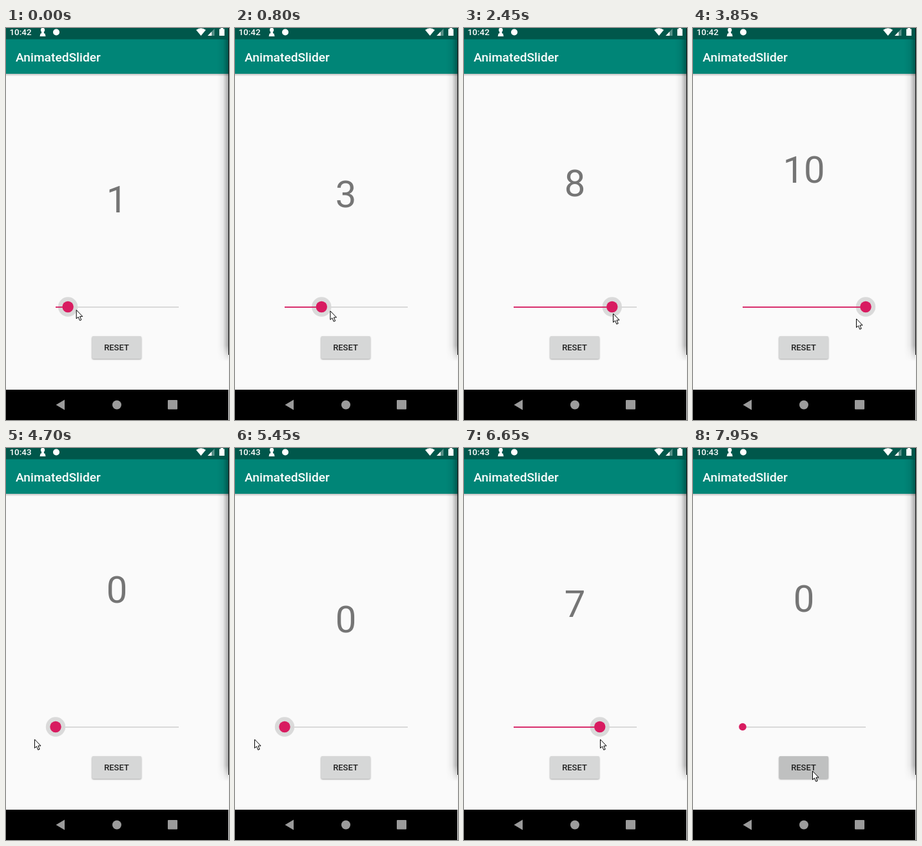
These frames come from a looping animation (346x608 px, 8 s). An HTML page:

```html
<!DOCTYPE html>
<html lang="en">
<head>
<meta charset="utf-8">
<title>Animated slider</title>
<style>
  html, body { margin: 0; width: 100%; height: 100%; overflow: hidden; background: #fafafa; }
  svg { display: block; width: 100%; height: 100%; font-family: Roboto, "Open Sans", sans-serif; }
  .medium { font-weight: 500; }
</style>
</head>
<body>
<svg viewBox="0 0 346 608">
  <defs>
    <linearGradient id="barShadow" x1="0" y1="0" x2="0" y2="1">
      <stop offset="0" stop-opacity=".24"/>
      <stop offset="1" stop-opacity="0"/>
    </linearGradient>
    <linearGradient id="edgeShadow">
      <stop offset="0" stop-opacity="0"/>
      <stop offset=".5" stop-opacity=".06"/>
      <stop offset="1" stop-opacity=".33"/>
    </linearGradient>
    <linearGradient id="edgeEnd" x1="0" y1="0" x2="0" y2="1">
      <stop offset=".95" stop-color="#fff"/>
      <stop offset="1" stop-color="#000"/>
    </linearGradient>
    <mask id="edgeMask"><rect x="325" y="17" width="21" height="500" fill="url(#edgeEnd)"/></mask>
    <filter id="soft" x="-10%" y="-20%" width="120%" height="150%"><feGaussianBlur stdDeviation="1"/></filter>
  </defs>

  <rect width="346" height="608" fill="#fafafa"/>

  <!-- status bar and toolbar -->
  <rect y="71" width="346" height="4" fill="url(#barShadow)"/>
  <rect width="346" height="71" fill="#008577"/>
  <rect width="346" height="17.5" fill="#00574b"/>
  <text id="clock" class="medium" x="5.5" y="11" font-size="13.4" fill="#fff">10:42</text>
  <g fill="#fff">
    <circle cx="57" cy="3" r="3.2"/>
    <path d="M55.5 4h3l.6 4.5h1.4l1 4.5h-9l1-4.5h1.4z"/>
    <circle cx="78" cy="6.5" r="5"/>
    <path d="M295 3Q302.500-2.500 310 3L302.500 12Z"/>
    <path d="M313 12L323.500 1V12Z" opacity=".35"/>
    <path d="M313 12L319 5.700V12Z"/>
    <path d="M331 1.500h2V0h4v1.500h2V12h-8z"/>
  </g>
  <text class="medium" x="15" y="52" font-size="19.2" fill="#fff">AnimatedSlider</text>

  <text id="number" x="172" font-size="58" fill="#757575" text-anchor="middle"></text>

  <!-- slider -->
  <circle id="halo" cy="432.5" r="15.2" fill-opacity=".125"/>
  <rect x="77" y="432" width="191" height="1.8" fill="#d6d6d6"/>
  <rect id="progress" x="77" y="432" height="1.8" fill="#d81b60"/>
  <circle id="thumb" cy="432.5" fill="#d81b60"/>

  <!-- button -->
  <rect x="133.5" y="479" width="76.5" height="35" rx="2" opacity=".35" filter="url(#soft)"/>
  <rect id="button" x="133.5" y="478" width="76.5" height="35" rx="2"/>
  <text class="medium" x="171.5" y="500" font-size="13" fill="#212121" text-anchor="middle">RESET</text>

  <!-- navigation bar -->
  <rect y="561" width="345" height="47"/>
  <g fill="#9b9b9b">
    <path d="M77.500 584.500L91 576.500V592.500Z"/>
    <circle cx="172" cy="584.5" r="7"/>
    <rect x="251" y="577" width="15" height="14.5" rx="1"/>
  </g>

  <!-- edge of the window -->
  <rect x="328" y="17" width="17" height="500" fill="url(#edgeShadow)" mask="url(#edgeMask)"/>
  <rect x="345" width="1" height="507" fill="#101010"/>
  <rect x="345" y="507" width="1" height="101" fill="#f4f4f4"/>

  <path id="cursor" d="M.5 0V13.500L3.500 10.800L5.800 16.300L8.200 15.300L5.900 10H10.100Z" fill="#fff" stroke="#000"/>
</svg>
<script>
const LOOP = 8000, TICK = 50;
const TRACK_START = 77, STEP = 19.1, MAX = 10;
const LAG = 140;                          // the slider trails the pointer
const RELEASE = 6650, PRESS = 7700, RESET = 7950;

// Spans in which the screen stands still before it catches up
const stalls = [[250, 800], [1700, 2050], [2450, 2600], [2750, 2900], [3500, 3700], [4000, 4150], [4200, 4350]];

// Moves: start time, end time, where to
const pointerHome = [99, 437];
const pointerMoves = [
  [-200, 1350, [174, 440]],
  [1500, 1700, [181, 440]],
  [1950, 2300, [231, 443]],
  [2450, 3300, [298, 445]],
  [3650, 3850, [253, 451]],
  [3950, 4750, [30, 452]],
  [5600, 6350, [211, 452]],
  [6650, 6900, [256, 485]],
  [6900, 7050, [240, 514]],
  [7050, 7400, [185, 501]]
];
const riseMoves = [
  [200, 1500, [17]],
  [1950, 2450, [25]],
  [2450, 3200, [45.5]],
  [4900, 5450, [0]],
  [6450, 6720, [31.5]]
];

const $ = id => document.getElementById(id);
const set = (id, attrs) => {
  for (const name in attrs) $(id).setAttribute(name, attrs[name]);
};
const clamp = (v, low, high) => Math.min(high, Math.max(low, v));
const progress = (t, start, end) => clamp((t - start) / (end - start), 0, 1);

const follow = (home, moves, t) => moves.reduce(
  (at, [start, end, goal]) => at.map((v, i) => v + (goal[i] - v) * progress(t, start, end)), home);

const pointerAt = t => follow(pointerHome, pointerMoves, t);

function valueAt(t) {
  if (t >= RESET) return 0;
  const [x] = pointerAt(Math.min(t - LAG, RELEASE));
  return clamp(Math.round((x - TRACK_START) / STEP), 0, MAX);
}

function screenTime(t) {
  const stall = stalls.find(([from, to]) => t >= from && t < to);
  return stall ? stall[0] : t;
}

function render(t) {
  const value = valueAt(t);
  const thumbX = TRACK_START + STEP * value;
  const release = progress(t, RELEASE + 100, RELEASE + 300);
  const [rise] = follow([0], riseMoves, t);

  $("clock").textContent = t < 4150 ? "10:42" : "10:43";
  $("number").textContent = value;
  set("number", { y: 285.7 - rise });
  set("halo", { cx: thumbX, opacity: 1 - release });
  set("thumb", { cx: thumbX, r: 8.7 - 2.9 * release });
  set("progress", { width: thumbX - TRACK_START });
  set("button", { fill: t < PRESS ? "#d6d7d7" : "#bfc0c0" });
  set("cursor", { transform: `translate(${pointerAt(t)})` });
}

const start = performance.now();
function frame() {
  const elapsed = (performance.now() - start) % LOOP;
  render(screenTime(Math.floor(elapsed / TICK) * TICK));
  requestAnimationFrame(frame);
}
frame();
</script>
</body>
</html>
```
